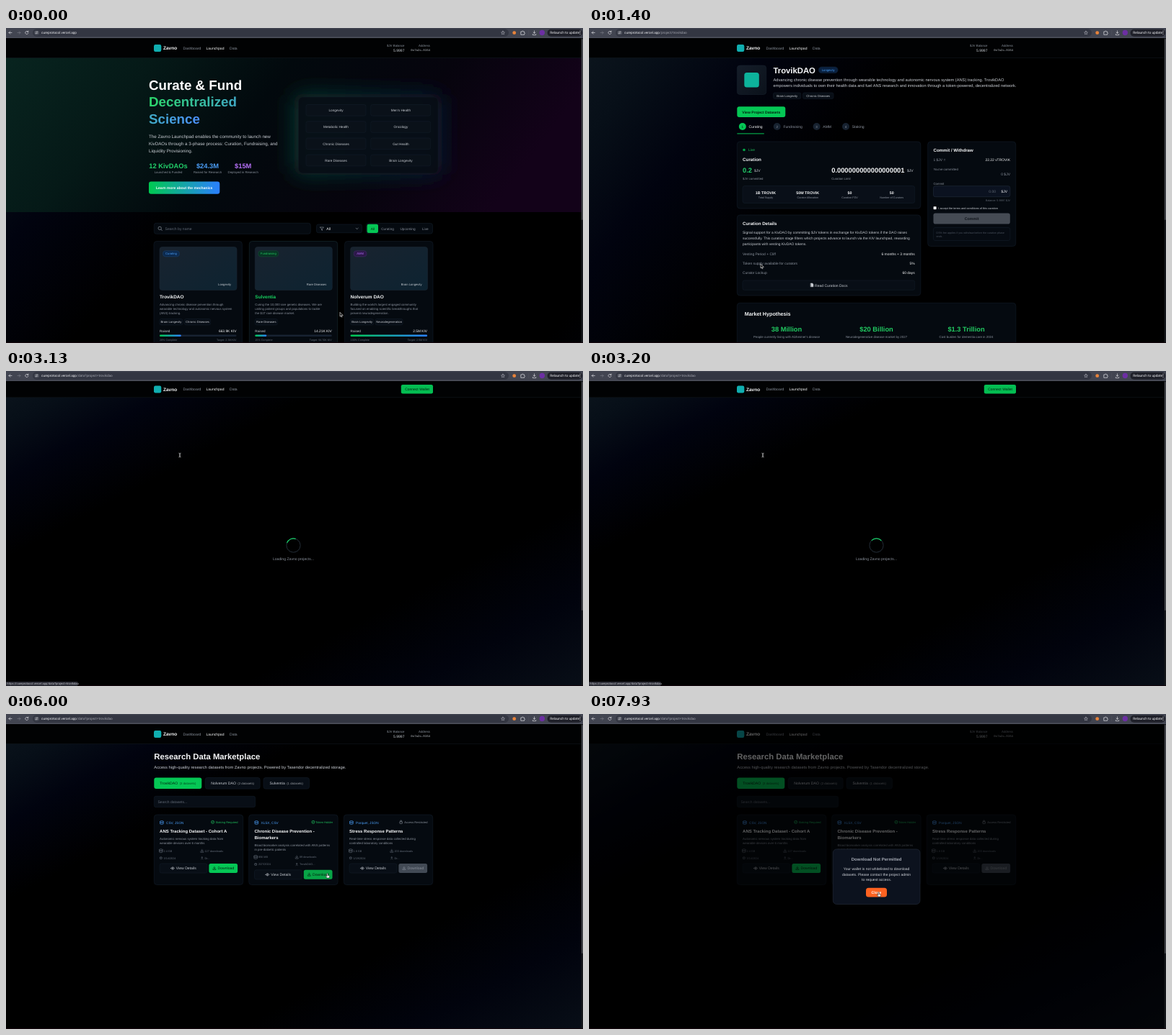
Write an HTML page that moves like this. It is 800 px wide and 438 px high and loops after 8000 ms.

```html
<!DOCTYPE html>
<html lang="en">
<head>
<meta charset="utf-8">
<title>Launchpad walkthrough</title>
<style>
html, body { margin: 0; width: 100%; height: 100%; overflow: hidden; background: #000; }
svg { display: block; width: 100%; height: 100%; }
text { font-family: "Liberation Sans", Arial, sans-serif; text-rendering: geometricPrecision; white-space: pre; }
.b { font-weight: 700; }
.ui { font-family: Roboto, sans-serif; }
.mono { font-family: "Liberation Mono", monospace; }
.m { text-anchor: middle; }
.e { text-anchor: end; }
</style>
</head>
<body>
<svg id="stage" viewBox="0 0 800 438"></svg>
<script>
const GREEN = '#05c755', MUTED = '#8b929d', DIM = '#626a76', LIGHT = '#c9cdd3', WHITE = '#f5f6f7';
const LINE = '#141e29', PANEL = '#050a10', FIELD = '#080e16', BLUE = '#4b9df5';

// Text is placed by the middle of its capitals.
const text = (x, y, size, str, fill = MUTED, cls = '', extra = '') =>
  `<text x="${x}" y="${y + size * .36}" font-size="${size}" fill="${fill}" class="${cls}" ${extra}>${str}</text>`;
const rect = (x, y, w, h, r, fill, stroke = 'none', extra = '') =>
  `<rect x="${x}" y="${y}" width="${w}" height="${h}" rx="${r}" fill="${fill}" stroke="${stroke}" stroke-width=".6" ${extra}/>`;
const path = (d, stroke, w = .7, fill = 'none') =>
  `<path d="${d}" fill="${fill}" stroke="${stroke}" stroke-width="${w}" stroke-linecap="round" stroke-linejoin="round"/>`;
const circle = (x, y, r, fill, stroke = 'none') =>
  `<circle cx="${x}" cy="${y}" r="${r}" fill="${fill}" stroke="${stroke}" stroke-width=".7"/>`;
const group = (id, content, extra = '') => `<g id="${id}" ${extra}>${content}</g>`;
const lines = (x, y, step, size, rows, fill) => rows.map((s, i) => text(x, y + i * step, size, s, fill)).join('');
const gradient = (id, stops, pos = 'x2="1"') =>
  `<linearGradient id="${id}" ${pos}>${stops.map(([o, c]) => `<stop offset="${o}" stop-color="${c}"/>`).join('')}</linearGradient>`;
const pill = (x, y, w, str, fill = FIELD, color = LIGHT, h = 8.4, r = 2) =>
  rect(x, y, w, h, r, fill, LINE) + text(x + w / 2, y + h / 2, 4.2, str, color, 'm');
const backdrop = h => rect(0, 14, 800, h, 0, 'url(#page)');

const defs = `<defs>
${gradient('page', [[0, '#0c151d'], [.07, '#070f18'], [.16, '#01030f'], [.29, '#000'], [.7, '#000'], [.85, '#01030d'], [1, '#080e17']], 'x2="1" y2="1"')}
${gradient('hero', [[0, '#08241f'], [.25, '#051917'], [.48, '#02090d'], [.75, '#06040d'], [1, '#130219']], 'x2="1" y2=".2"')}
${gradient('title1', [[0, '#2bd66a'], [1, '#4b8ff8']], 'gradientUnits="userSpaceOnUse" x1="198" x2="390"')}
${gradient('title2', [[0, '#2bd66a'], [1, '#4b8ff8']], 'gradientUnits="userSpaceOnUse" x1="76" x2="268"')}
${gradient('action', [[0, '#00c950'], [1, '#2b7fff']])}
${gradient('cover', [[0, '#19232f'], [1, '#0d2331']], 'x2="1" y2="1"')}
${gradient('tile', [[0, '#151d29'], [1, '#0b121b']], 'x2="1" y2="1"')}
${gradient('glow', [[0, '#0a3a30'], [1, '#091c33']])}
<filter id="blur" x="-50%" y="-50%" width="200%" height="200%"><feGaussianBlur stdDeviation="15"/></filter>
</defs>`;

const header = (connected = true) => {
  const h = connected ? 27.5 : 23, y = connected ? 28 : 25.5;
  return rect(0, 14, 800, h, 0, '#010203') + rect(0, 13.5 + h, 800, .6, 0, '#10171d') +
    rect(205, y - 5, 10.3, 10, 2.2, '#10aeb0') + text(218, y, 6.5, 'Zavno', WHITE, 'b') +
    text(245.5, y, 5.05, 'Dashboard') + text(277.5, y, 5.05, 'Launchpad', WHITE) + text(310, y, 5.05, 'Data') +
    (connected
      ? text(552.5, 24, 4.36, '$JV Balance', MUTED, 'e') + text(552.5, 31, 5.07, '5.9997', LIGHT, 'e') +
        text(588, 24.5, 4.36, 'Address', MUTED, 'e') + text(588, 31, 4.05, '0x7a2c…9154', LIGHT, 'e mono')
      : rect(547.8, 19, 44.2, 12.6, 2.3, '#04bd52') + text(570, 25.4, 5, 'Connect Wallet', '#02200f', 'm'));
};

const topics = [['Longevity', "Men's Health"], ['Metabolic Health', 'Oncology'], ['Chronic Diseases', 'Gut Health'], ['Rare Diseases', 'Brain Longevity']];

const projects = [
  { x: 205, id: 'card1', name: 'TrovikDAO', stage: 'Curating', color: BLUE, bg: '#0c2a4f', badge: 23, topic: 'Longevity',
    about: ['Advancing chronic disease prevention through', 'wearable technology and autonomic nervous system', '(ANS) tracking.'],
    tags: [['Brain Longevity', 32], ['Chronic Diseases', 36]], raised: '663.9K KIV', done: .28, foot: ['28% Complete', 'Target: 2.3M KIV'] },
  { x: 337.3, id: 'card2', name: 'Sulventia', stage: 'Fundraising', color: '#22c55e', bg: '#083524', badge: 28, topic: 'Rare Diseases',
    about: ['Curing the 10,000 rare genetic diseases. We are', 'uniting patient groups and populations to tackle', 'the $1T rare disease market.'],
    tags: [['Rare Diseases', 31]], raised: '14.21K KIV', done: .15, foot: ['15% Complete', 'Target: 94.70K KIV'] },
  { x: 469.6, id: 'card3', name: 'Nolverum DAO', stage: 'AMM', color: '#b06cf5', bg: '#2d184a', badge: 18, topic: 'Brain Longevity',
    about: ["Building the world's largest engaged community", 'focused on enabling scientific breakthroughs that', 'prevent neurodegeneration.'],
    tags: [['Brain Longevity', 32], ['Neurodegeneration', 38]], raised: '2.5M KIV', done: 1, foot: ['100% Complete', 'Target: 2.5M KIV'] }
];

function projectCard({ x, id, name, stage, color, bg, badge, topic, about, tags, raised, done, foot }) {
  const left = x + 8;
  let tagX = left;
  const tagPills = tags.map(([s, w]) => { const p = pill(tagX, 404.5, w, s); tagX += w + 2.5; return p; }).join('');
  return rect(x, 296.5, 122.4, 160, 4, PANEL, LINE, `id="${id}-box"`) +
    rect(left, 304.5, 107, 60, 3.5, 'url(#cover)', '#1b2733') +
    rect(left + 4.5, 309.7, badge, 8.3, 4.1, bg, color, 'stroke-opacity=".2"') + text(left + 4.5 + badge / 2, 313.9, 4.2, stage, color, 'm') +
    text(left + 99, 356, 4.2, topic, LIGHT, 'e') +
    text(left, 374, 6.5, name, WHITE, 'b', `id="${id}"`) + lines(left, 384, 6.2, 4.32, about, MUTED) + tagPills +
    text(left, 421, 4.6, 'Raised', LIGHT) + text(left + 106.5, 421, 4.85, raised, WHITE, 'e') +
    rect(left, 426.5, 106.5, 2.6, 1.3, '#182231') + rect(left, 426.5, 106.5 * done, 2.6, 1.3, 'url(#action)') +
    text(left, 434, 3.7, foot[0], DIM) + text(left + 106.5, 434, 3.7, foot[1], DIM, 'e');
}

const home = backdrop(900) + rect(0, 41, 800, 215, 0, 'url(#hero)') +
  rect(400, 92, 204, 112, 10, 'url(#glow)', 'none', 'filter="url(#blur)"') + header() +
  text(198, 78.8, 18.75, 'Curate &amp; Fund', '#fff', 'b') + text(198, 102.5, 18.75, 'Decentralized', 'url(#title1)', 'b') +
  text(198, 126, 18.75, 'Science', 'url(#title2)', 'b') +
  lines(198, 150.4, 10.1, 6.25, ['The Zavno Launchpad enables the community to launch new', 'KivDAOs through a 3-phase process: Curation, Fundraising, and', 'Liquidity Provisioning.'], LIGHT) +
  [[225, '12 KivDAOs', '#22d06a', 'Launched &amp; Funded'], [279.5, '$24.3M', BLUE, 'Raised for Research'], [328.7, '$15M', '#b570f6', 'Deployed in Research']]
    .map(([x, n, c, s]) => text(x, 191.5, 9.35, n, c, 'b m') + text(x, 200, 4.3, s, MUTED, 'm')).join('') +
  rect(198, 213.5, 98.3, 17.3, 3.2, 'url(#action)') + text(247.2, 222.2, 5, 'Learn more about the mechanics', '#fff', 'b m') +
  rect(405.5, 96, 193.5, 106, 6, '#070d14', '#101a22', 'fill-opacity=".9"') +
  topics.flatMap((row, r) => row.map((s, c) => rect(416 + c * 89.7, 106.5 + r * 23.25, 83, 15.6, 2.5, '#0a1119', LINE) +
    text(457.5 + c * 89.9, 114.4 + r * 23.25, 4.7, s, LIGHT, 'm'))).join('') +
  rect(205.3, 271.3, 217, 15, 3, PANEL, LINE) + circle(213.2, 278.4, 2.2, 'none', MUTED) + path('M214.9 280.1l1.5 1.5', MUTED) +
  text(220.5, 279, 5.1, 'Search by name', DIM) +
  rect(430.5, 273, 63, 11.7, 2.5, PANEL, LINE) + path('M435.5 277h5l-2 2.3v2.2l-1-.6v-1.6z', MUTED, .6) +
  text(444.3, 279, 5.1, 'All', WHITE) + path('M485.2 278.2l1.5 1.5 1.5-1.5', MUTED) +
  rect(499.5, 271.5, 92, 14.6, 3, PANEL, LINE) + rect(500.6, 272.8, 15.4, 12.2, 2.3, GREEN) +
  text(508.4, 279, 4.7, 'All', '#03250f', 'm') + text(529, 279, 4.7, 'Curating', MUTED, 'm') +
  text(557, 279, 4.7, 'Upcoming', MUTED, 'm') + text(581.3, 279, 4.7, 'Live', MUTED, 'm') + projects.map(projectCard).join('');

const panel = (x, y, w, h) => rect(x, y, w, h, 4, PANEL, LINE);
const pair = (x1, x2, y, a, b) => text(x1, y, 4.95, a, MUTED) + text(x2, y, 4.95, b, WHITE, 'e');

const project = backdrop(1000) + header() +
  rect(205.3, 52, 40.5, 40.5, 4, 'url(#tile)', '#17212c') + rect(215.3, 62, 20.5, 20.5, 3.5, '#0db39c') +
  text(255.5, 58.5, 11.3, 'TrovikDAO', WHITE, 'b') + pill(318.2, 54, 27, 'Longevity', '#0a2140', BLUE, 8.8, 4.4) +
  lines(255.5, 71.5, 8.8, 5.7, ['Advancing chronic disease prevention through wearable technology and autonomic nervous system (ANS) tracking. TrovikDAO', 'empowers individuals to own their health data and fuel ANS research and innovation through a token-powered, decentralized network.'], LIGHT) +
  pill(255.5, 90, 38.3, 'Brain Longevity') + pill(296.5, 90, 42.5, 'Chronic Diseases') +
  rect(205.3, 109.3, 67, 14.8, 3, GREEN) + text(238.8, 116.7, 5.1, 'View Project Datasets', '#03200f', 'b m') +
  [[212.8, 'Curating'], [260.7, 'Fundraising'], [315.6, 'AMM'], [356, 'Staking']].map(([x, s], i) =>
    circle(x, 137, 5, i ? '#172230' : GREEN) + text(x, 137, 4.5, i + 1, i ? MUTED : '#03200f', 'm') + text(x + 8.7, 137, 5.05, s, i ? MUTED : WHITE)).join('') +
  rect(205.3, 146.4, 37.5, 1, 0, GREEN) +
  panel(205.3, 158, 254.5, 93) + circle(215, 169.5, 1.8, '#04a548') + text(221, 169.5, 4.8, 'Live', '#22c55e') +
  text(213, 182.5, 6.3, 'Curation', WHITE, 'b') + text(213, 197.5, 9.35, '0.2', '#22d06a', 'b') + text(229, 198.5, 5, '$JV', LIGHT) +
  text(213, 209, 4.3, '$JV committed') + text(336.2, 197.5, 9.35, '0.000000000000000001', WHITE, 'b') + text(441, 198.5, 5, '$JV', LIGHT) +
  text(336.2, 209, 4.3, 'Curation Limit') + rect(213, 219.5, 238.7, 24, 3, '#090f18', LINE) +
  [[245, '1B TROVIK', 'Total Supply'], [303.2, '50M TROVIK', 'Curator Allocation'], [361.5, '$0', 'Curation FDV'], [419.7, '50', 'Number of Curators']]
    .map(([x, n, s]) => text(x, 229, 5.3, n, WHITE, 'b m') + text(x, 236, 3.75, s, MUTED, 'm')).join('') +
  panel(205.3, 260, 254.5, 112) + text(213, 271.5, 6.2, 'Curation Details', WHITE, 'b') +
  lines(213, 284.7, 7.6, 4.95, ['Signal support for a KivDAO by committing $JV tokens in exchange for KivDAO tokens if the DAO raises', 'successfully. This curation stage filters which projects advance to launch via the KIV launchpad, rewarding', 'participants with vesting KivDAO tokens.'], LIGHT) +
  pair(213, 451.7, 314.7, 'Vesting Period + Cliff', '6 months + 3 months') + pair(213, 451.7, 327.3, 'Token supply available for curators', '5%') +
  pair(213, 451.7, 340, 'Curator Lockup', '60 days') + rect(213, 351, 238.7, 13.3, 2.5, FIELD, LINE) +
  path('M307.5 355h2.2l1.3 1.3v3.5h-3.5z', LIGHT, .5, LIGHT) + text(313, 357.7, 5.05, 'Read Curation Docs', LIGHT) +
  panel(205.3, 382.3, 386.5, 80) + text(215.7, 397.5, 7.2, 'Market Hypothesis', WHITE, 'b') +
  [[274, '38 Million', "People currently living with Alzheimer's disease"], [398.5, '$20 Billion', 'Neurodegenerative disease market by 2027'], [523, '$1.3 Trillion', 'Cost burden for dementia care in 2024']]
    .map(([x, n, s]) => text(x, 418.3, 9.3, n, '#22cc62', 'b m') + text(x, 429.4, 4.4, s, MUTED, 'm')).join('') +
  panel(469.7, 158, 122, 145.5) + text(477.5, 170, 6.1, 'Commit / Withdraw', WHITE, 'b') +
  pair(477.5, 584, 183, '1 $JV =', '22.22 vTROVIK') + text(477.5, 196, 4.4, "You've committed") + text(584, 203.3, 5, '0 $JV', MUTED, 'e') +
  text(477.5, 216, 4.3, 'Commit') + rect(477.5, 219.7, 106.3, 15, 2.5, '#0b1220', '#222d3b') +
  text(564, 227.3, 5, '0.00', DIM, 'e') + text(580, 227.3, 5, '$JV', WHITE, 'e') + text(584, 240, 3.7, 'Balance: 5.9997 $JV', DIM, 'e') +
  rect(477.6, 248.2, 4, 4, .6, '#fff') + text(484.3, 250.3, 3.85, 'I accept the terms and conditions of this curation', LIGHT) +
  rect(477.5, 257.5, 106.3, 15, 2.8, '#454b54') + text(530.6, 265.2, 5.3, 'Commit', '#10151b', 'b m') +
  rect(477.5, 277.5, 106.3, 18, 2.5, '#060b12', LINE) +
  lines(481.5, 284.3, 5.2, 3.65, ['0.5% fee applies if you withdraw before the curation phase', 'ends.'], '#4c5460');

const loading = backdrop(424) + header(false) + circle(398.5, 242.5, 9.6, 'none', '#334150') +
  '<path id="spinner" d="M391.7 235.7a9.6 9.6 0 0 1 13.6 0" fill="none" stroke="#17cf68" stroke-width="1.1"/>' +
  text(398.5, 261.5, 5.1, 'Loading Zavno projects...', MUTED, 'm');

const icons = {
  db: (x, y, c) => `<ellipse cx="${x}" cy="${y - 1.6}" rx="2.3" ry=".9" fill="none" stroke="${c}" stroke-width=".6"/>` +
    path(`M${x - 2.3} ${y - 1.6}v3.5q2.3 1.4 4.6 0v-3.5M${x - 2.3} ${y + .2}q2.3 1.4 4.6 0`, c, .6),
  down: (x, y, c) => path(`M${x} ${y - 2}v2.8m-1.3-1.3l1.3 1.3 1.3-1.3M${x - 2} ${y + 1}v1.1h4v-1.1`, c, .6),
  eye: (x, y, c) => path(`M${x - 2.4} ${y}q2.4-3.4 4.8 0q-2.4 3.4-4.8 0z`, c, .6) + circle(x, y, .7, 'none', c),
  lock: (x, y, c) => rect(x - 1.8, y - .5, 3.6, 2.6, .5, 'none', c) + path(`M${x - 1.1} ${y - .5}v-.8a1.1 1.1 0 0 1 2.2 0v.8`, c, .6),
  check: (x, y, c) => circle(x, y, 2, 'none', c) + path(`M${x - .9} ${y}l.6.7 1.1-1.3`, c, .5),
  cal: (x, y, c) => rect(x - 1.4, y - 1.3, 2.8, 2.7, .4, 'none', c) + path(`M${x - 1.4} ${y - .4}h2.8`, c, .4),
  user: (x, y, c) => circle(x, y - .8, .7, 'none', c) + path(`M${x - 1.3} ${y + 1.5}q1.3-1.9 2.6 0`, c, .5)
};

const datasets = [
  { x: 205.3, type: 'CSV, JSON', access: 'Staking Required', accessIcon: 'check', color: '#1fbd5c', title: ['ANS Tracking Dataset - Cohort A'],
    about: ['Autonomic nervous system tracking data from', 'wearable devices over 6 months'], meta: ['2.4 GB', '127 downloads', '3/14/2024', 'Dr...'], button: GREEN },
  { x: 336.7, type: 'XLSX, CSV', access: 'Token Holder', accessIcon: 'check', color: '#1fbd5c', title: ['Chronic Disease Prevention -', 'Biomarkers'],
    about: ['Blood biomarker analysis correlated with ANS patterns', 'in pre-diabetic patients'], meta: ['856 MB', '89 downloads', '2/27/2024', 'TrovikDAO...'], button: '#08a447' },
  { x: 468.3, type: 'Parquet, JSON', access: 'Access Restricted', accessIcon: 'lock', color: MUTED, title: ['Stress Response Patterns'],
    about: ['Real-time stress response data collected during', 'controlled laboratory conditions'], meta: ['1.8 GB', '203 downloads', '1/19/2024', 'Dr...'], button: '#424a55' }
];

function datasetCard({ x, type, access, accessIcon, color, title, about, meta, button }) {
  const left = x + 7.8, dy = (title.length - 1) * 8.8, buttonY = 208 + dy, enabled = button !== '#424a55';
  const ink = enabled ? '#03200f' : '#8a919b', accessX = x + 116 - access.length * 1.98;
  return panel(x, 140, 123.4, 97.5) + icons.db(left + 2.8, 151, BLUE) + text(left + 9, 151, 4.7, type, BLUE) +
    icons[accessIcon](accessX - 3, 150.3, color) + text(x + 116.3, 150.3, 4.05, access, color, 'e') +
    title.map((s, i) => text(left, 163.3 + i * 8.9, 6, s, WHITE, 'b')).join('') +
    lines(left, 173.4 + dy, 6.3, 4.35, about, MUTED) +
    meta.map((s, i) => {
      const mx = left + i % 2 * 57, my = 190.2 + dy + (i >> 1) * 10;
      return icons[['db', 'down', 'cal', 'user'][i]](mx + 1.7, my, DIM) + text(mx + 5.4, my, 3.8, s, DIM);
    }).join('') +
    rect(left, buttonY, 65.8, 13, 2.5, FIELD, LINE) + icons.eye(left + 18, buttonY + 6.5, LIGHT) + text(left + 22.7, buttonY + 6.5, 5.1, 'View Details', LIGHT) +
    rect(left + 68.3, buttonY, 39.7, 13, 2.5, button) + icons.down(left + 75.8, buttonY + 6.3, ink) + text(left + 80.5, buttonY + 6.5, 5.1, 'Download', ink);
}

const data = backdrop(424) + header() +
  text(205.3, 58.7, 11.3, 'Research Data Marketplace', WHITE, 'b') +
  text(205.3, 74, 5.75, 'Access high-quality research datasets from Zavno projects. Powered by Tasendor decentralized storage.', LIGHT) +
  [[205.3, 66, 'TrovikDAO', 3], [276.2, 76, 'Nolverum DAO', 2], [357, 63.5, 'Sulventia', 1]].map(([x, w, s, n], i) =>
    rect(x, 88.5, w, 15.6, 3, i ? FIELD : GREEN, i ? LINE : 'none') +
    text(x + w / 2, 96.4, 5.15, `${s} <tspan font-size="4.3" fill-opacity=".75" dx="1">(${n} datasets)</tspan>`, i ? LIGHT : '#03200f', 'm')).join('') +
  rect(205.3, 114.3, 140.3, 15.3, 2.5, FIELD, LINE) + text(210.5, 122, 5.05, 'Search datasets...', DIM) + datasets.map(datasetCard).join('');

const modal = rect(0, 14, 800, 424, 0, '#000', 'none', 'fill-opacity=".6"') + rect(338.3, 188, 120.7, 76.5, 5, '#0c121e', '#252e3c') +
  text(398.6, 202.3, 6, 'Download Not Permitted', '#a4a9b3', 'b m') +
  ['Your wallet is not whitelisted to download', 'datasets. Please contact the project admin', 'to request access.'].map((s, i) => text(398.6, 215.5 + i * 7.5, 5.05, s, '#d0d3d9', 'm')).join('') +
  rect(384, 241.7, 29, 12.7, 3.5, '#ff6a22', 'none', 'id="close"') + text(398.5, 248, 5.1, 'Close', '#fff', 'b m');

const toolbar = rect(0, 0, 800, 13, 0, '#424551') + rect(0, 13, 800, 1, 0, '#4d505b') + rect(37, 1.3, 660, 10.6, 5.3, '#333642') +
  path('M8 6.5h-4m1.8-1.8L4 6.5l1.8 1.8', '#d8d9df') + path('M16 6.5h4m-1.8-1.8L20 6.5l-1.8 1.8', '#767883') +
  path('M30.6 5.3a2.1 2.1 0 1 0 .3 1.8M30.9 4v1.5h-1.5', '#d8d9df') +
  circle(42.5, 6.5, 3.6, '#454853') + path('M40.8 5.5h1.6m1.6 0h.2M40.8 7.5h.2m1.6 0h1.6', '#d0d1d7', .5) + circle(43.1, 5.5, .5, 'none', '#d0d1d7') + circle(41.8, 7.5, .5, 'none', '#d0d1d7') +
  text(49, 6.6, 4.7, 'cureprotocol.vercel.app<tspan id="route" fill="#a2a4ad"></tspan>', '#f0f0f3', 'ui') +
  path('M689 4.2l.7 1.5 1.7.2-1.2 1.2.3 1.7-1.5-.8-1.5.8.3-1.7-1.2-1.2 1.7-.2z', '#c8c9d0', .5) +
  circle(704.7, 6.7, 2.4, '#e8833a') +
  path('M714.2 5h1.4a.8.8 0 0 1 1.6 0h1.4v1.5a.8.8 0 0 1 0 1.6v1.2h-4.4z', '#e1e2e7', .7) + rect(724.7, 3, .4, 7, 0, '#5b5d68') +
  path('M732.5 4v3.4m-1.5-1.4l1.5 1.5 1.5-1.5M730.3 8.5v1.2h4.4V8.5', '#d8d9df') + circle(743.3, 6.5, 3.7, '#6c2fa3') +
  rect(750.5, 1.7, 48.5, 10, 5, '#1f2029') + text(754.3, 6.6, 4.75, 'Relaunch to update', '#f0f0f3', 'ui') +
  [4.4, 6.6, 8.8].map(y => circle(796, y, .55, '#e0e0e5')).join('');

const cursors = group('arrow', path('M0 0v5.4l1.3-1.1.9 2 .9-.4-.9-2h1.7z', '#eee', .6, '#111')) +
  group('beam', path('M-1.2-2.8q1.2 0 1.2.7v4.2q0 .7-1.2.7M1.2-2.8q-1.2 0-1.2.7v4.2q0 .7 1.2.7', '#e5e5e5', .6)) +
  group('hand', path('M-.7-1.5q.7-1 1.3 0v2.3l2 .5q.8.3.6 1.1l-.6 2.1h-3l-1.9-2.5q.2-.9 1.1-.3l.5.5z', '#111', .5, '#f4f4f4'));

const stage = document.getElementById('stage');
stage.innerHTML = defs + Object.entries({ home, project, loading, data, modal }).map(([id, s]) => group(id, s)).join('') +
  rect(797.6, 14, 2.4, 424, 0, '#15171b') + rect(798, 15, 1.6, 252, .8, '#4c4e54', 'none', 'id="thumb"') +
  rect(0, 437, 800, 1, 0, '#14060c') +
  group('status', rect(0, 432, 88, 6, 1, '#2c2d36', 'none', 'id="statusBox"') + text(1.3, 435, 4.1, '', '#c4c6cd', 'ui', 'id="statusText"')) +
  toolbar + group('cursor', cursors);

const $ = id => document.getElementById(id);
const show = (id, on) => $(id).style.display = on ? '' : 'none';
const clamp = v => Math.max(0, Math.min(1, v));
const smooth = v => (v = clamp(v)) * v * (3 - 2 * v);
const mix = (a, b, k) => `rgb(${a.map((v, i) => Math.round(v + (b[i] - v) * k))})`;

const OPEN_PROJECT = 1400, OPEN_DATA = 3000, LOADED = 3400, DENIED = 6070, LOOP = 8000;
// Each move: start, end, x, y.
const moves = [[70, 870, 238, 328.5], [1800, 2500, 239, 139], [2640, 2900, 241, 117], [3530, 4120, 445.5, 223.5], [6600, 7400, 401.5, 249.5]];

function pointer(t) {
  let x = 463, y = 395.7;
  for (const [start, end, toX, toY] of moves) {
    const k = smooth((t - start) / (end - start));
    x += (toX - x) * k;
    y += (toY - y) * k;
  }
  return [x, y];
}

function hover(id, k) {
  $(id).setAttribute('fill', mix([245, 246, 247], [24, 208, 96], k));
  $(id + '-box').setAttribute('stroke', mix([20, 30, 41], [24, 44, 50], k));
}

function draw(now) {
  const t = now % LOOP;
  const onHome = t < OPEN_PROJECT, onProject = !onHome && t < OPEN_DATA, onLoading = t >= OPEN_DATA && t < LOADED;
  show('home', onHome);
  show('project', onProject);
  show('loading', onLoading);
  show('data', t >= LOADED);
  show('modal', t >= DENIED);
  $('route').textContent = onHome ? '' : onProject ? '/project/trovikdao' : '/data?project=trovikdao';
  $('thumb').setAttribute('height', t < OPEN_DATA ? 252 : 318);

  hover('card2', 1 - clamp((t - 440) / 150));
  hover('card1', clamp((t - 500) / 150));

  const projectLink = t >= 930 && onHome, dataLink = t >= 2740 && t < LOADED;
  show('status', projectLink || dataLink);
  $('statusBox').setAttribute('width', projectLink ? 88.5 : 99.5);
  $('statusText').textContent = 'https://cureprotocol.vercel.app/' + (projectLink ? 'project/trovikdao' : 'data?project=trovikdao');
  $('spinner').setAttribute('transform', `rotate(${(t - 3200) * .36} 398.5 242.5)`);

  const [x, y] = pointer(t);
  const onClose = t > 7250;
  const shape = onLoading ? 'beam' : onClose || t >= 4050 && t < DENIED || t >= 2700 && t < OPEN_DATA ? 'hand' : 'arrow';
  for (const id of ['arrow', 'beam', 'hand']) show(id, id === shape);
  $('cursor').setAttribute('transform', `translate(${x} ${y})`);
  $('close').setAttribute('fill', mix([255, 122, 40], [255, 98, 32], clamp((t - 7250) / 150)));
  requestAnimationFrame(() => draw(performance.now()));
}
draw(performance.now());
</script>
</body>
</html>
```
